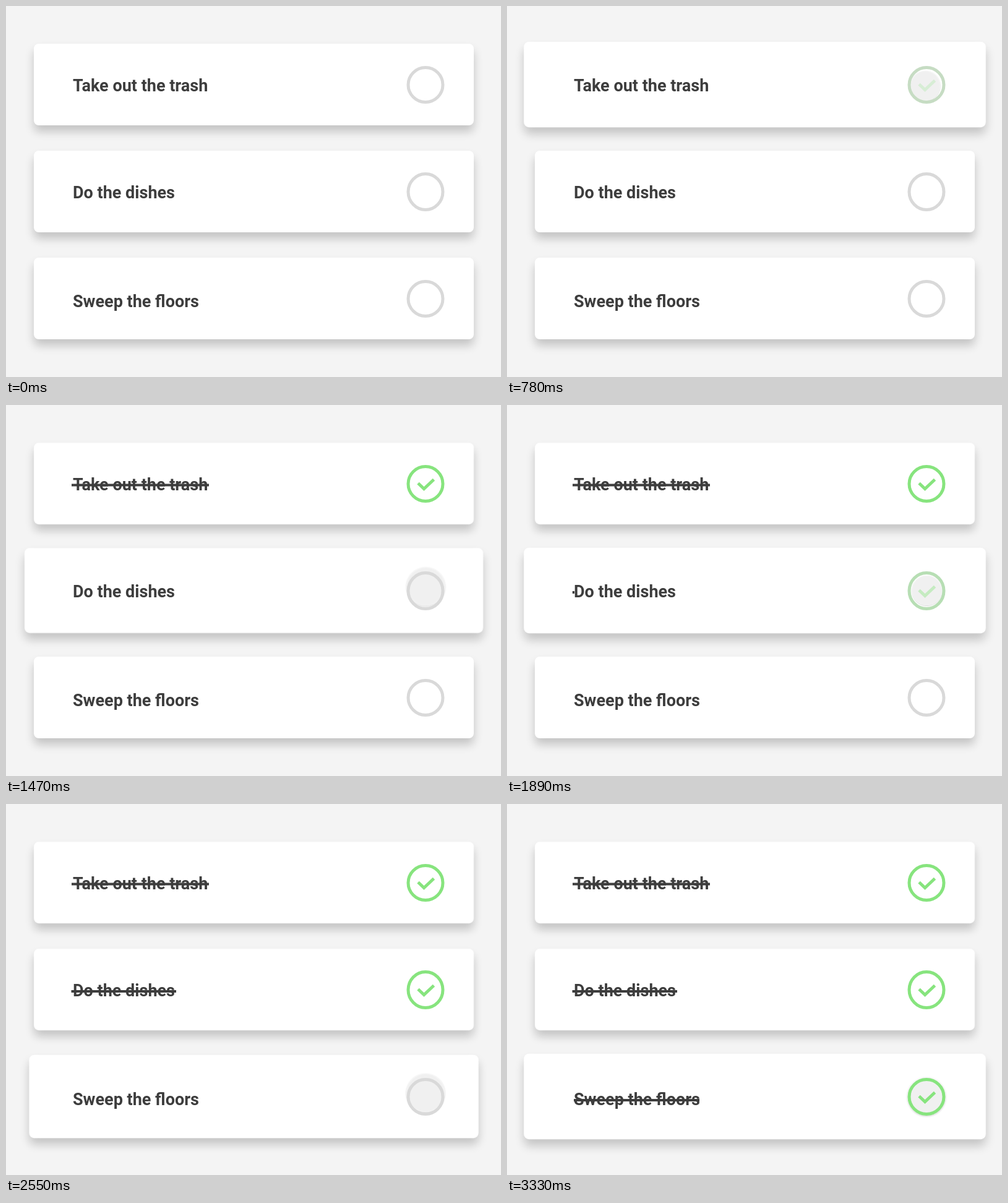
Recreate the animation shown at these times as an HTML page. Size 800 px wide and 600 px high, loop 4.14 s.

```html
<!DOCTYPE html>
<html lang="en">
<head>
<meta charset="utf-8">
<title>Chores</title>
<style>
  html, body { margin: 0; width: 100%; height: 100%; overflow: hidden; background: #f4f4f4; }
  .stage { position: relative; width: 800px; height: 600px; overflow: hidden; }
  .stage > * { position: absolute; }

  .card, .cursor, .ring, .check, .strike {
    animation: 4140ms ease-in-out infinite;
  }

  .card {
    left: 44.75px; top: var(--y);
    width: 710.5px; height: 132px;
    border-radius: 8px;
    background: #fff;
    box-shadow: 0 10px 15px rgba(0, 0, 0, .2);
  }

  .cursor {
    left: -31px; top: -31px;
    width: 62px; height: 62px;
    box-sizing: border-box;
    border: 1px solid rgba(255, 255, 255, .3);
    border-radius: 50%;
    background: rgba(235, 235, 235, .75);
    box-shadow: 0 1px 3px rgba(0, 0, 0, .2);
    animation-name: move, press;
    animation-timing-function: ease, ease-in-out;
  }

  svg { left: 0; top: 0; }
  text { font: 700 27px Roboto, sans-serif; fill: #3d3d3d; }
  .ring, .check { fill: none; stroke-width: 5; --done: #87e47e; }
  .ring { --idle: #d9d9d9; }
  .check { --idle: rgba(135, 228, 126, 0); }
  .strike { fill: #3d3d3d; transform-box: fill-box; transform-origin: 0 50%; }

  .card.a { animation-name: hoverA; }
  .card.b { animation-name: hoverB; }
  .card.c { animation-name: hoverC; }
  .a .ring, .a .check { animation-name: tickA; }
  .b .ring, .b .check { animation-name: tickB; }
  .c .ring, .c .check { animation-name: tickC; }
  .a .strike { animation-name: strikeA; }
  .b .strike { animation-name: strikeB; }
  .c .strike { animation-name: strikeC; }

  /* Cards grow while the cursor is over them */
  @keyframes hoverA {
    0%, 5.07%, 31.4%, 100% { transform: scale(1); }
    13.04%, 27.29% { transform: scale(1.05); }
  }
  @keyframes hoverB {
    0%, 29.71%, 60.39%, 100% { transform: scale(1); }
    37.68%, 55.19% { transform: scale(1.05); }
  }
  @keyframes hoverC {
    0%, 57.97% { transform: scale(1); }
    65.94%, 100% { transform: scale(1.05); }
  }

  @keyframes move {
    0%, 2.54% { translate: 836px 211px; }
    13.41%, 27.32% { translate: 676px 129px; }
    38.19%, 53.29% { translate: 678.5px 300px; }
    64.15%, 100% { translate: 678px 473px; }
  }
  @keyframes press {
    0%, 16.67%, 23.19%, 42.75%, 49.28%, 71.01%, 77.54%, 100% { scale: 1; }
    19.08%, 45.17%, 73.43% { scale: .77; }
  }

  @keyframes tickA {
    0%, 16.67% { stroke: var(--idle); }
    23.19%, 100% { stroke: var(--done); }
  }
  @keyframes tickB {
    0%, 42.75% { stroke: var(--idle); }
    49.28%, 100% { stroke: var(--done); }
  }
  @keyframes tickC {
    0%, 71.01% { stroke: var(--idle); }
    77.54%, 100% { stroke: var(--done); }
  }

  @keyframes strikeA {
    0%, 18.84% { transform: scaleX(0); }
    26.09%, 100% { transform: scaleX(1); }
  }
  @keyframes strikeB {
    0%, 44.93% { transform: scaleX(0); }
    52.17%, 100% { transform: scaleX(1); }
  }
  @keyframes strikeC {
    0%, 73.19% { transform: scaleX(0); }
    80.43%, 100% { transform: scaleX(1); }
  }
</style>
</head>
<body>
<div class="stage">
  <div class="card a" style="--y: 61px"></div>
  <div class="card b" style="--y: 234px"></div>
  <div class="card c" style="--y: 407px"></div>
  <div class="cursor"></div>
  <svg width="800" height="600" viewBox="0 0 800 600">
    <g class="a">
      <text x="108" y="138">Take out the trash</text>
      <rect class="strike" x="106" y="127.5" width="222" height="4"/>
      <circle class="ring" cx="678" cy="127.5" r="28"/>
      <path class="check" d="M666 126.5 L675.5 135.5 L691.5 120.5"/>
    </g>
    <g class="b">
      <text x="108" y="311">Do the dishes</text>
      <rect class="strike" x="105.5" y="301" width="169.5" height="4"/>
      <ellipse class="ring" cx="678" cy="300.5" rx="28" ry="29"/>
      <path class="check" d="M666 299.5 L675.5 308.5 L691.5 293.5"/>
    </g>
    <g class="c">
      <text x="108" y="487">Sweep the floors</text>
      <rect class="strike" x="108" y="477" width="203" height="4"/>
      <circle class="ring" cx="678" cy="473.5" r="28"/>
      <path class="check" d="M666 472.5 L675.5 481.5 L691.5 466.5"/>
    </g>
  </svg>
</div>
</body>
</html>
```
